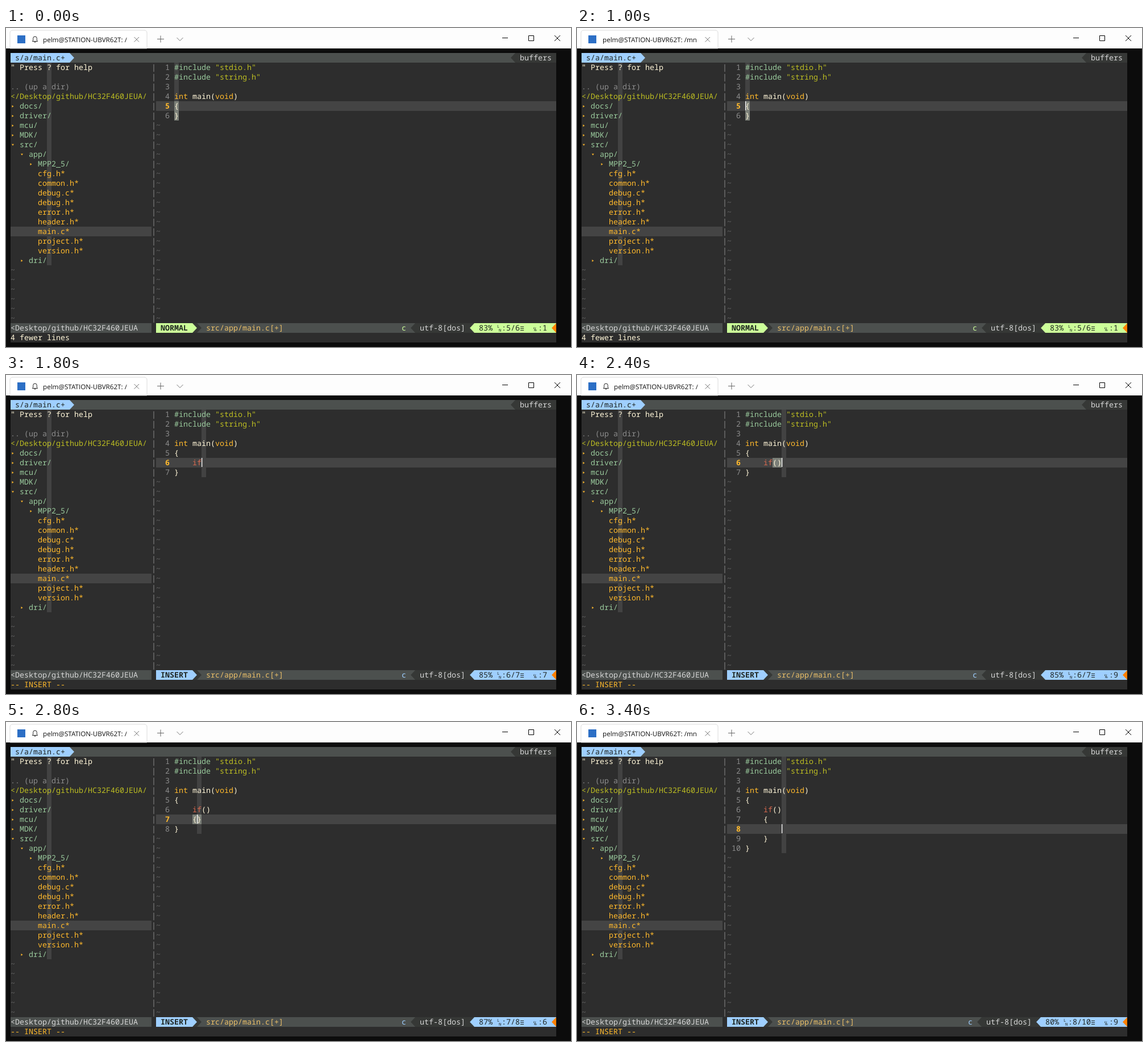
Animation, 994 px wide and 562 px high, one loop 3600 ms. Source, as an HTML page:

```html
<!DOCTYPE html>
<html lang="en">
<head>
<meta charset="utf-8">
<title>Terminal editor</title>
<style>
  html, body { margin: 0; width: 100%; height: 100%; overflow: hidden; background: #0c0c0c; }
  svg { display: block; }
  text { white-space: pre; }
  .mono { font: 500 13.333px "Noto Sans Mono", "DejaVu Sans Mono", monospace; text-rendering: geometricPrecision; }
  .title { font: 11.65px "Open Sans", "Noto Sans", sans-serif; fill: #111; }
  .bold { font-weight: 700; }
  .line { fill: none; stroke-width: 1; }
</style>
</head>
<body>
<svg width="994" height="562" viewBox="0 0 994 562">
  <defs><clipPath id="tabClip"><rect x="40" y="5" width="172.5" height="30"/></clipPath></defs>
  <g id="fixed"></g>
  <g id="live" class="mono"></g>
</svg>
<script>
const LOOP = 3600, CW = 8, RH = 17, LEFT = 8, TOP = 44, CODE_X = 296;
const C = {
  bg: '#2d2d2d', bar: '#444444', column: '#424242', gray: '#4c504e', dark: '#363836',
  text: '#fff6d8', soft: '#d6d6d6', dim: '#8c8c8c', faint: '#626262',
  yellow: '#ffb92c', green: '#99c99c', lime: '#bcbd22', red: '#d9694f',
  match: '#7b7f78', normal: '#ccff99', insert: '#9fcfff', ink: '#1f2620', orange: '#ff8000'
};

const rowY = r => TOP + r * RH;
const esc = s => s.replace(/&/g, '&amp;').replace(/</g, '&lt;');
const rect = (x, y, w, h, fill) => `<rect x="${x}" y="${y}" width="${w}" height="${h}" fill="${fill}"/>`;
const cells = (x, r, w, fill) => rect(x, rowY(r), w, RH, fill);
const text = (x, r, s, fill, cls = '') =>
  `<text x="${x}" y="${rowY(r) + 13}" fill="${fill}" class="${cls}">${esc(s)}</text>`;
const poly = (pts, fill) => `<polygon points="${pts}" fill="${fill}"/>`;
const line = (d, color) => `<path class="line" d="${d}" stroke="${color}"/>`;
const arrowR = (x, r, fill) => poly(`${x},${rowY(r)} ${x + 8},${rowY(r) + 8.5} ${x},${rowY(r + 1)}`, fill);
const arrowL = (x, r, fill) => poly(`${x + 8},${rowY(r)} ${x},${rowY(r) + 8.5} ${x + 8},${rowY(r + 1)}`, fill);

// File tree: [depth, name], '+' closed folder, '-' open folder
const tree = [
  [0, '+docs/'], [0, '+driver/'], [0, '+mcu/'], [0, '+MDK/'], [0, '-src/'],
  [1, '-app/'], [2, '+MPP2_5/'],
  ...['cfg.h', 'common.h', 'debug.c', 'debug.h', 'error.h', 'header.h', 'main.c', 'project.h', 'version.h']
    .map(n => [2, ' ' + n + '*']),
  [1, '+dri/']
];

function windowBar() {
  return rect(0, 0, 994, 36, '#fdfdfd') +
    '<path d="M7 36V9q0-5 5-5H243q5 0 5 5V36z" fill="#fff" stroke="#dcdcdc"/>' +
    rect(20, 13, 14, 14, '#2c6fc5') +
    line('M225.5 16l8.5 8.5M234 16l-8.5 8.5', '#777') +
    line('M266 19.5h12M272 13.5v12', '#666') +
    line('M300.5 17l5.5 5.5l5.5-5.5', '#777') +
    line('M873 17.5h10M919.5 13.5h9v9h-9zM965 13l10 10M975 13l-10 10', '#000');
}

function treePane() {
  let s = cells(LEFT, 18, 248, C.bar) + rect(72, rowY(1), CW, RH * 21, C.column) +
    text(LEFT, 1, '" Press ? for help', C.text) +
    text(LEFT, 3, '.. (up a dir)', C.dim) +
    text(LEFT, 4, '</Desktop/github/HC32F460JEUA/', C.lime);
  tree.forEach(([depth, name], i) => {
    const r = i + 5, x = LEFT + depth * 16, y = rowY(r) + 9, kind = name[0];
    if (kind === '+') s += poly(`${x + 2.5},${y - 2} ${x + 5.5},${y} ${x + 2.5},${y + 2}`, C.yellow);
    if (kind === '-') s += poly(`${x + 2},${y - 1.5} ${x + 6},${y - 1.5} ${x + 4},${y + 1.5}`, C.yellow);
    s += text(x + 16, r, name.slice(1), kind === ' ' ? C.yellow : C.green);
  });
  for (let r = 22; r < 28; r++) s += text(LEFT, r, '~', C.faint);
  for (let r = 1; r < 28; r++) s += text(256, r, '|', C.dim);
  return s + cells(LEFT, 28, 248, C.gray) + text(LEFT, 28, '<Desktop/github/HC32F460JEUA', C.soft);
}

function tabLine() {
  return cells(LEFT, 0, 960, C.gray) + cells(LEFT, 0, 104, C.insert) + arrowR(112, 0, C.insert) +
    text(16, 0, 's/a/main.c+', C.ink) +
    arrowL(888, 0, C.dark) + cells(896, 0, 72, C.dark) + text(904, 0, 'buffers', C.soft);
}

// Editor steps: body holds the lines between the outer braces
const edit = (at, body, ln, col, more = {}) => ({ at, body, ln, col, bell: true, caret: true, insert: true, ...more });
const idle = (at, caret, bell) => edit(at, [], 5, 1, { caret, bell, insert: false, match: [[5, 1], [6, 1]] });
const IF = '    if()';
const block = [IF, '    {', '', '    }'];
const steps = [
  idle(0, false, true),
  idle(200, true, true),
  idle(400, false, true),
  idle(800, false, false),
  idle(1000, true, false),
  edit(1200, [''], 6, 5),
  edit(1400, ['    i'], 6, 6),
  edit(1600, ['    if'], 6, 7),
  edit(2000, [IF], 6, 8, { match: [[6, 7], [6, 8]] }),
  edit(2200, [IF], 6, 9, { match: [[6, 7], [6, 8]] }),
  edit(2600, [IF, ''], 7, 5),
  edit(2800, [IF, '    {}'], 7, 6, { match: [[7, 5], [7, 6]] }),
  edit(3000, block, 8, 9),
  edit(3200, block, 8, 9, { bell: false })
];

const head = ['#include "stdio.h"', '#include "string.h"', '', 'int main(void)', '{'];
const token = /#\w+|"[^"]*"|\b(?:int|void|if)\b|[^\s#"]+?(?=\b(?:int|void|if)\b|\s|$)/g;

function colorOf(w) {
  if (w[0] === '#') return C.green;
  if (w[0] === '"') return C.lime;
  if (w === 'if') return C.red;
  return w === 'int' || w === 'void' ? C.yellow : C.text;
}

const codeLine = (r, s) =>
  [...s.matchAll(token)].map(m => text(CODE_X + m.index * CW, r, m[0], colorOf(m[0]))).join('');

function editor(st) {
  const lines = [...head, ...st.body, '}'], x = CODE_X + (st.col - 1) * CW;
  let s = rect(x, rowY(1), CW, RH * lines.length, C.column) + cells(264, st.ln, 704, C.bar);
  for (const [r, c] of st.match || []) s += cells(CODE_X + (c - 1) * CW, r, CW, C.match);
  lines.forEach((l, i) => {
    const n = i + 1;
    s += text(264, n, String(n).padStart(3), n === st.ln ? C.yellow : C.dim, n === st.ln ? 'bold' : '') + codeLine(n, l);
  });
  for (let r = lines.length + 1; r < 28; r++) s += text(264, r, '~', C.faint);
  if (st.caret) s += rect(x, rowY(st.ln), 1.3, 16, '#fff');
  return s + status(st, lines.length);
}

function status(st, total) {
  const hue = st.insert ? C.insert : C.normal, pos = `:${st.ln}/${total}`;
  const d = (4 - pos.length) * CW, y = rowY(28);
  const tiny = (x, dy, ch, size) =>
    `<text x="${x}" y="${y + dy}" fill="${C.ink}" style="font-size:${size}px">${ch}</text>`;
  return cells(264, 28, 704, C.gray) +
    cells(328, 28, 8, C.dark) + arrowR(336, 28, C.dark) +
    cells(264, 28, 64, hue) + arrowR(328, 28, hue) +
    text(272, 28, st.insert ? 'INSERT' : 'NORMAL', C.ink, 'bold') +
    text(352, 28, 'src/app/main.c[+]', '#eabf69') +
    text(696 + d, 28, 'c', hue) +
    arrowL(712 + d, 28, C.dark) + cells(720 + d, 28, 104, C.dark) +
    text(728 + d, 28, 'utf-8[dos]', C.soft) +
    arrowL(816 + d, 28, hue) + cells(824 + d, 28, 144 - d, hue) +
    text(832 + d, 28, Math.floor(100 * st.ln / total) + '%', C.ink) +
    tiny(864 + d, 8, 'L', 7) + tiny(867 + d, 15, 'N', 7) +
    text(872 + d, 28, pos, C.ink) +
    line(`M905 ${y + 6.5}h6M905 ${y + 9.5}h6M905 ${y + 12.5}h6`, C.ink) +
    tiny(928, 14, '℅', 9) + text(936, 28, ':' + st.col, C.ink) +
    arrowL(960, 28, C.orange) +
    text(LEFT, 29, st.insert ? '-- INSERT --' : '4 fewer lines', st.insert ? C.yellow : C.text);
}

function tabTitle(bell) {
  const icon = bell ? line('M46.5 23.5h9l-1.2-2v-3.2a3.3 3.3 0 0 0-6.6 0v3.2zM49.5 25h3', '#222') : '';
  return icon + `<g clip-path="url(#tabClip)"><text class="title" x="${bell ? 65 : 45}" y="24.5">pelm@STATION-UBVR62T: /mn</text></g>`;
}

document.getElementById('fixed').innerHTML =
  rect(0, 0, 994, 562, '#0c0c0c') + rect(LEFT, TOP, 960, RH * 30, C.bg) + windowBar() +
  `<g class="mono">${tabLine()}${treePane()}</g>`;

const live = document.getElementById('live');
let shown;
function frame() {
  const t = performance.now() % LOOP;
  const st = steps.findLast(s => s.at <= t);
  if (st !== shown) {
    live.innerHTML = tabTitle(st.bell) + editor(st);
    shown = st;
  }
  requestAnimationFrame(frame);
}
frame();
</script>
</body>
</html>
```
